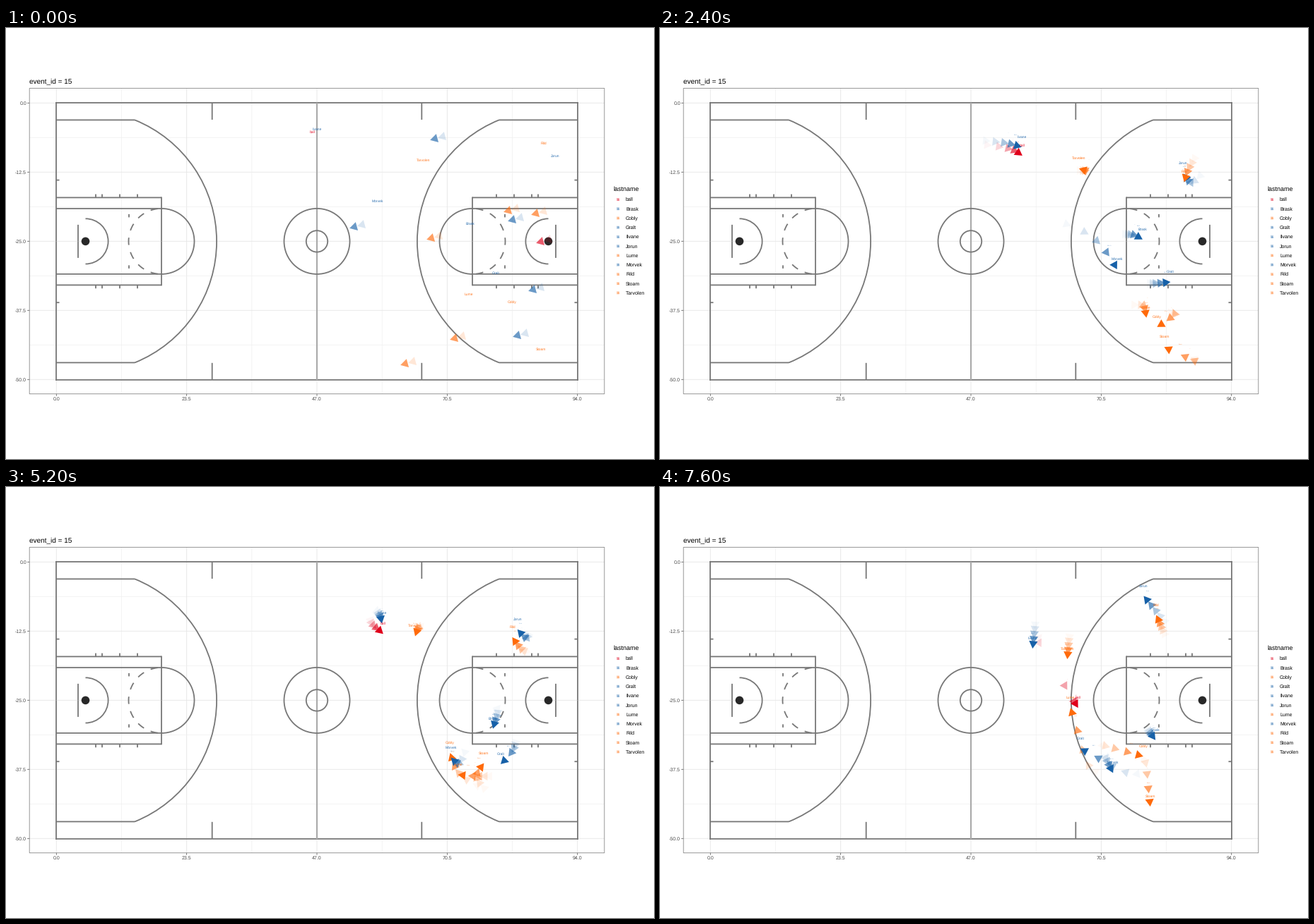
These frames come from a looping animation (917 px wide and 611 px high, 8 s). A matplotlib script:

```python
import numpy as np
import matplotlib.pyplot as plt
from matplotlib.animation import FuncAnimation
from matplotlib.patches import Arc, Circle, Polygon, Rectangle

W, H, DPI = 917, 611, 100
PT = 72 / DPI  # points per pixel
FRAMES, STEP_MS = 20, 400
RED, BLUE, ORANGE = "#e0001b", "#1761a8", "#ff6a0a"
LINE, LINE_WIDTH = "#777777", 1.8
TRAIL = 4
T = np.arange(FRAMES)

plt.rcParams.update({"font.family": "Liberation Sans", "path.snap": False,
                     "text.hinting": "none", "text.hinting_factor": 1})
fig = plt.figure(figsize=(W / DPI, H / DPI), dpi=DPI, facecolor="white")
ax = fig.add_axes([0, 0, 1, 1])
ax.set(xlim=(0, W), ylim=(H, 0))
ax.axis("off")


def line(x0, y0, x1, y1, color=LINE, width=LINE_WIDTH, z=2):
    ax.plot([x0, x1], [y0, y1], color=color, lw=width * PT, zorder=z,
            solid_capstyle="butt")


def label(x, y, text, size, color="black", **kw):
    return ax.text(x, y, text, fontsize=size * PT, color=color, **kw)


def draw_panel():
    left, right, top, bottom = 33.2, 846.8, 85.4, 518.7
    for i in range(5):
        x, y = 71.3 + 184.35 * i, 106.3 + 98 * i
        line(x, top, x, bottom, "#e6e6e6", 0.9, 1)
        line(left, y, right, y, "#e6e6e6", 0.9, 1)
        if i < 4:
            line(x + 92.2, top, x + 92.2, bottom, "#efefef", 0.7, 1)
            line(left, y + 49, right, y + 49, "#efefef", 0.7, 1)
        line(x, bottom, x, bottom + 3, "#555555", 0.8)
        line(left - 3, y, left, y, "#555555", 0.8)
        label(x, 528.3, f"{23.5 * i:.1f}", 6.8, "#4d4d4d", ha="center")
        label(29, y + 2.4, f"{-12.5 * i if i else 0:.1f}", 6.8, "#4d4d4d",
              ha="right")
    ax.add_patch(Rectangle((left, top), right - left, bottom - top, fill=False,
                           ec="#8c8c8c", lw=0.9 * PT, zorder=3))
    label(33, 79.3, "event_id = 15", 10.1)


def arc(x, y, r, middle, spread):
    """Arc around a middle angle, in screen degrees clockwise from the right."""
    ax.add_patch(Arc((x, y), 2 * r, 2 * r, theta1=middle - spread,
                     theta2=middle + spread, color=LINE, lw=LINE_WIDTH * PT,
                     capstyle="butt", zorder=2))


def draw_half(side):
    """Half court; side is 1 on the left and -1 on the right."""
    mid_x, mid_y = 440, 302.4
    facing = 0 if side == 1 else 180

    def row(x0, x1, dy):
        for y in (mid_y - dy, mid_y + dy):
            line(mid_x + side * (x0 - mid_x), y, mid_x + side * (x1 - mid_x), y)

    def column(x, dy0, dy1):
        sx = mid_x + side * (x - mid_x)
        for s in (-1, 1):
            line(sx, mid_y + s * dy0, sx, mid_y + s * dy1)

    hoop, foul = mid_x + side * (112.5 - mid_x), mid_x + side * (220 - mid_x)
    column(71, 0, 197.3)
    column(102, 0, 23.5)
    column(220, 0, 62.9)
    column(174, 34, 38.5)
    column(291.7, 172.4, 196.4)
    for x in (127, 136, 161, 186):
        column(x, 62, 66.8)
    row(71, 182, 172)
    row(71, 220, 62)
    row(71, 220, 46.4)
    row(71, 75.5, 86.8)
    arc(hoop, mid_y, 185.6, facing, 68)
    arc(hoop, mid_y, 32.1, facing, 90)
    arc(foul, mid_y, 46.5, facing, 90)
    for i in range(-3, 4):
        arc(foul, mid_y, 46.5, facing + 180 + i * 180 / 7, 6.4)
    ax.add_patch(Circle((hoop, mid_y), 5.8, color="#282828", lw=0, zorder=3))


def draw_court():
    for y in (106, 498.8):
        line(70, y, 810, y)
    line(440, 106, 440, 499, "#aaaaaa", 2.1)
    for r in (46.5, 15.2):
        arc(440, 302.4, r, 0, 180)
    for side in (1, -1):
        draw_half(side)


def glide(points):
    """Path through points evenly spaced in time, without overshoot."""
    p = np.array(points, float)
    step = np.diff(p, axis=0)
    a, b = step[:-1], step[1:]
    bend = np.where(a * b > 0, 2 * a * b / np.where(a + b == 0, 1, a + b), 0)
    slope = np.vstack([step[:1], bend, step[-1:]])
    s = T * (len(p) - 1) / (FRAMES - 1)
    k = np.minimum(s.astype(int), len(p) - 2)
    u = (s - k)[:, None]
    return (p[k] + step[k] * u * u * (3 - 2 * u)
            + slope[k] * u * (1 - u) ** 2 - slope[k + 1] * u * u * (1 - u))


def dribble_and_pass(carrier, target, release=16):
    """Ball swings around its carrier, then flies to the target."""
    swing = 8 * np.cos(2 * np.pi * (T - 4) / 12) - 2
    path = carrier + np.c_[swing, 4 + T]
    u = np.clip((T - release) / (FRAMES - 1 - release), 0, 1)
    eased = (1 - (1 - u) ** 3)[:, None]
    held = path[np.minimum(T, release)]
    return held + (np.array(target) - held) * eased


class Mover:
    DRIFT = np.array([-11, 3])  # common drift at the end of the last play

    def __init__(self, name, color, last_spot, path):
        self.name, self.color, self.path = name, color, path
        self.last_spot = np.array(last_spot)
        vx, vy = np.gradient(path, axis=0).T
        self.heading = np.arctan2(vy, vx)

    def triangle(self, frame, alpha):
        if frame > 0:
            centre, turn = self.path[frame], self.heading[frame]
        elif frame in (-1, -3):
            centre = self.last_spot + self.DRIFT * (frame + 1) / 2
            turn = np.arctan2(self.DRIFT[1], self.DRIFT[0])
        else:
            return []
        a = turn + np.arange(3) * 2 * np.pi / 3
        corners = centre + 7.1 * np.c_[np.cos(a), np.sin(a)]
        return [ax.add_patch(Polygon(corners, fc=self.color, ec="none",
                                     alpha=alpha, zorder=4))]

    def tag(self, frame, size, alpha):
        if frame < 0:
            return []
        (x, y), turn = self.path[frame], self.heading[frame]
        return [label(x + 7 * np.cos(turn),
                      y + 7 * np.sin(turn) - 15 + 0.35 * size, self.name, size,
                      self.color, ha="center", alpha=alpha, zorder=5)]


def player(name, color, last_spot, *points):
    return Mover(name, color, last_spot, glide(points))


players = [
    player("Brask", BLUE, (717, 272),
           (650, 292), (669, 293), (696, 317), (690, 341), (697, 353)),
    player("Cobly", ORANGE, (711, 259), (709, 403), (729, 405),
           (687, 429), (638, 402), (626, 366), (677, 380)),
    player("Gralt", BLUE, (746, 371), (686, 362), (700, 362),
           (722, 360), (718, 372), (672, 407), (601, 374)),
    player("Ilvane", BLUE, (607, 157),
           (433, 157), (494, 164), (526, 177), (531, 191), (528, 222)),
    player("Jorun", BLUE, (724, 436), (782, 191), (752, 219),
           (741, 208), (736, 214), (713, 189), (689, 160)),
    player("Lume", ORANGE, (602, 298), (648, 392), (684, 393),
           (688, 410), (667, 410), (614, 403), (583, 320)),
    player("Morvek", BLUE, (493, 282), (519, 257), (615, 299),
           (652, 360), (640, 392), (630, 383), (638, 399)),
    player("Rild", ORANGE, (750, 263),
           (764, 172), (747, 202), (735, 233), (716, 212), (705, 188)),
    player("Stoam", ORANGE, (635, 440), (756, 463), (757, 472),
           (689, 438), (666, 410), (685, 386), (693, 446)),
    player("Tarvolen", ORANGE, (565, 476),
           (584, 202), (602, 202), (586, 198), (580, 209), (577, 237)),
]
handler = next(p for p in players if p.name == "Ilvane")
ball = Mover("ball", RED, (757, 303),
             dribble_and_pass(handler.path, (588, 307)))
movers = [ball] + players


def draw_legend():
    label(859, 231.3, "lastname", 8.7)
    for i, m in enumerate(movers):
        y = 243 + 13.24 * i
        ax.add_patch(Rectangle((864, y - 2), 4, 4, fc=m.color, ec="none",
                               alpha=0.3))
        label(866, y + 1.6, "a", 5.5, m.color, ha="center", alpha=0.7)
        label(877, y + 2.3, m.name, 6.8)


moving = []


def update(frame):
    for artist in moving:
        artist.remove()
    moving.clear()
    for age in range(TRAIL, -1, -1):
        for m in movers:
            moving.extend(m.triangle(frame - age, (1 - age / 5) ** 2))
    for age in (2, 1, 0):
        for m in movers:
            moving.extend(m.tag(frame - age, 5.5 * 0.45 ** age, 0.9 * 0.6 ** age))
    return moving


draw_panel()
draw_court()
draw_legend()
anim = FuncAnimation(fig, update, frames=FRAMES, interval=STEP_MS,
                     init_func=lambda: [], repeat=True, repeat_delay=0)
plt.show()
```
